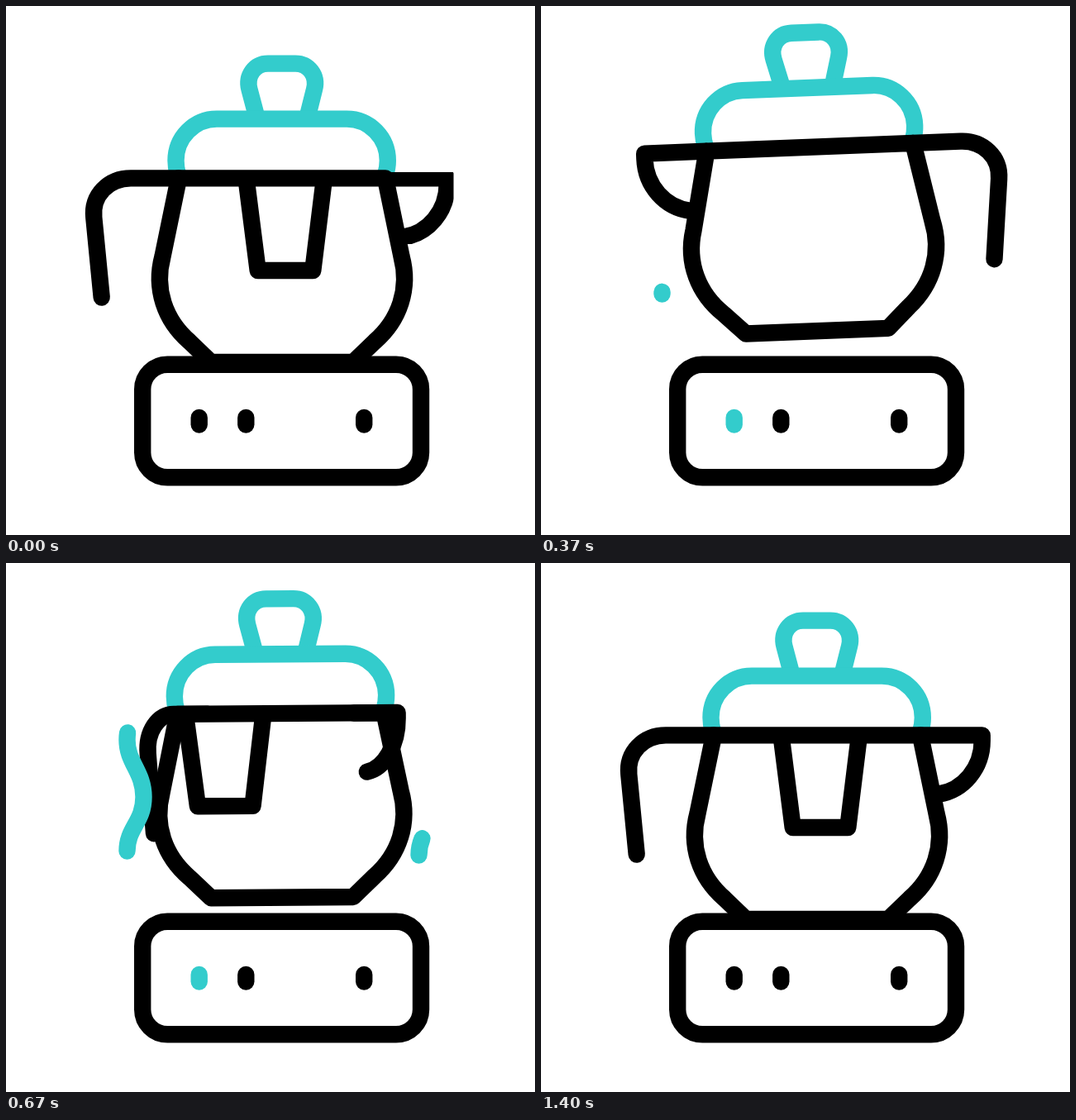
These frames come from a looping animation (640 by 640 pixels, 1.67 s). An HTML page with a canvas:

```html
<!DOCTYPE html>
<html lang="en">
<head>
<meta charset="utf-8">
<title>Kettle</title>
<style>
  html, body { margin: 0; height: 100%; overflow: hidden; background: #fff; }
  canvas { display: block; }
</style>
</head>
<body>
<canvas width="640" height="640"></canvas>
<script>
const ctx = document.querySelector('canvas').getContext('2d');
const LOOP = 1670, FPS = 30, TEAL = '#33cccc', BLACK = '#000';
const AXIS = 333.7, FOOT = 431, STEAM_LENGTH = 213;

const lid = new Path2D('M208 204Q205.5 196 205.5 187A49.5 50.4 0 0 1 255 136.6H412.3A49.5 50.4 0 0 1 461.8 187Q461.8 196 459 204');
const knob = new Path2D('M303.5 135L294.5 101C290 84 301 69.6 317 69.6H350C366 69.6 377.5 84 373 101L364.500 135');
const body = new Path2D('M209 208.4L189.5 303C179 342 192 380 222 406L248 431H420L446 406C476 380 489 342 478.5 303L459 208.4Z');
const pane = new Path2D('M290.5 208.4L304.7 320H371.3L385 208.4');
const handle = new Path2D('M209 208.4H151C124 208.4 103.500 229 106.300 256L115.700 352.5');
const spout = new Path2D('M459 208.4H533.7V215C533.7 248 511 275 481 279.7');
const steam = new Path2D('M146.500 348.500C146.500 320 166.500 314 166.500 283C166.500 252 146.500 242 146.500 214C146.500 184 166.500 182 166.500 150.500');
const stove = new Path2D();
stove.roundRect(165.2, 433.7, 336.8, 136.5, 30);

const progress = (f, a, b) => Math.min(1, Math.max(0, (f - a) / (b - a)));
const smooth = x => x * x * (3 - 2 * x);

// Interpolates [frame, value] keys.
function track(f, keys, ease = x => x) {
  let value = keys[0][1];
  for (let i = 1; i < keys.length; i++) {
    const [a, from] = keys[i - 1], [b, to] = keys[i];
    if (f > a) value = from + (to - from) * ease(progress(f, a, b));
  }
  return value;
}

function stroke(path, color = BLACK) {
  ctx.strokeStyle = color;
  ctx.stroke(path);
}

function fillWhite(path) {
  ctx.fillStyle = '#fff';
  ctx.fill(path);
}

// Squeezes a path towards the axis while the line keeps its weight.
function turned(path, cos) {
  const out = new Path2D();
  out.addPath(path, new DOMMatrix([cos, 0, 0, 1, AXIS * (1 - cos), 0]));
  return out;
}

function drawPot(f) {
  const tilt = track(f, [[0, 0], [6, -13.5], [13.5, 1.7], [21, -.5], [26, 0]], smooth);
  const lift = track(f, [[1.5, 0], [14.5, 46], [15.4, 46], [25.6, 0]], smooth);
  const spin = track(f, [[0, 0], [7, 116], [11, 180], [17, 270], [23, 360]]);
  const cos = Math.cos(spin * Math.PI / 180);
  const handleInFront = spin < 180;

  const drawHandle = () => stroke(turned(handle, cos));
  const drawSpout = () => {
    ctx.save();
    if (spin < 90) {
      ctx.beginPath();
      ctx.rect(0, 201, 541.5, 87);
      ctx.clip();
    }
    stroke(turned(spout, cos));
    ctx.restore();
  };

  ctx.save();
  ctx.translate(AXIS, FOOT - lift);
  ctx.rotate(tilt * Math.PI / 180);
  ctx.translate(-AXIS, -FOOT);

  stroke(knob, TEAL);
  stroke(lid, TEAL);
  handleInFront ? drawSpout() : drawHandle();
  fillWhite(body);
  ctx.save();
  ctx.clip(body);
  ctx.translate((spin < 180 ? spin : spin - 360) * 1.6, 0);
  stroke(pane);
  ctx.restore();
  stroke(body);
  handleInFront ? drawHandle() : drawSpout();
  ctx.restore();
}

function drawStove(f) {
  fillWhite(stove);
  stroke(stove);
  const glow = Math.min(progress(f, 0, 5), 1 - progress(f, 37, 42));
  for (const x of [233.7, 290.3, 433.2]) {
    const lamp = new Path2D(`M${x} 498V506.5`);
    if (x > 250 || glow < 1) stroke(lamp);
    if (x < 250) {
      ctx.globalAlpha = glow;
      stroke(lamp, TEAL);
      ctx.globalAlpha = 1;
    }
  }
}

function drawSteam(f, dx, dy) {
  const head = smooth(progress(f, 10, 25.6)) * STEAM_LENGTH;
  const tail = smooth(progress(f, 20.1, 34.5)) * STEAM_LENGTH;
  if (head - tail < .1) return;
  ctx.save();
  ctx.translate(dx, dy);
  ctx.setLineDash([head - tail, 999]);
  ctx.lineDashOffset = -tail;
  stroke(steam, TEAL);
  ctx.restore();
}

function draw() {
  const f = Math.floor((performance.now() % LOOP + 5) * FPS / 1000);
  ctx.clearRect(0, 0, 640, 640);
  ctx.lineWidth = 20.4;
  ctx.lineCap = ctx.lineJoin = 'round';
  drawPot(f);
  drawStove(f);
  drawSteam(f, 0, 0);
  drawSteam(f - 7, 353, 5);
  requestAnimationFrame(draw);
}
draw();
</script>
</body>
</html>
```
